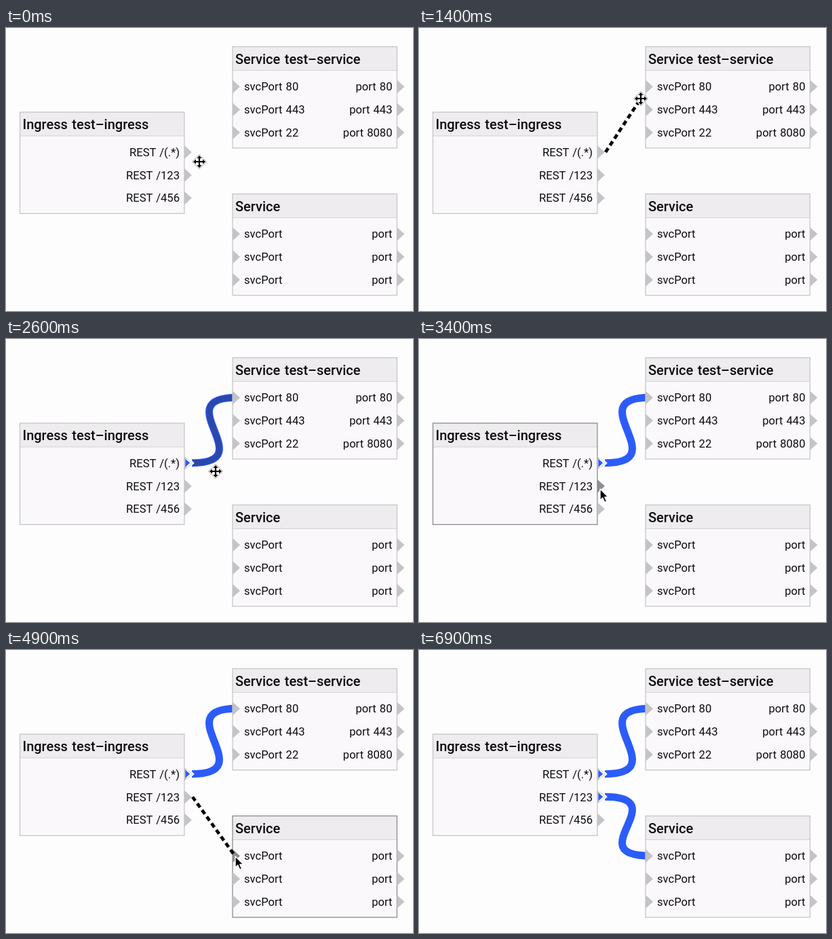
Write an HTML page that moves like this. It is 600 by 417 pixels and loops after 7 s.

```html
<!DOCTYPE html>
<html lang="en">
<head>
<meta charset="utf-8">
<title>Connecting ports</title>
<style>
  html, body { margin: 0; width: 100%; height: 100%; overflow: hidden; background: #fefdfe; }
  svg { display: block; width: 100vw; height: 100vh; }
  text { font: 16.6px Roboto, sans-serif; word-spacing: 1px; fill: #0c0c0c; }
  .title { font-size: 20px; font-weight: 500; word-spacing: 1.5px; }
  .end { text-anchor: end; }
  .body { fill: #faf8fb; }
  .head { fill: #eeecee; }
  .rule { stroke: #d3d2d5; }
  .frame { fill: none; stroke: #c6c5c8; stroke-width: 1.3; }
  .lit .frame { stroke: #8b8b8d; }
  .port { fill: #c4c3c6; }
  .port.lit { fill: #8e8e90; }
  .edge path { fill: none; stroke: #2b5cfb; stroke-width: 11; }
  .edge .core { stroke: #2a48ac; stroke-width: 8.5; display: none; }
  .edge.hover .core { display: inline; }
  .notch { fill: none; stroke: #fefdfe; stroke-width: 4.5; }
  .notch + .notch { stroke: #d3d2d5; stroke-width: 1; }
  #wire { stroke: #000; stroke-width: 4.7; stroke-dasharray: 7 5; }
</style>
</head>
<body>
<svg viewBox="0 0 600 417" preserveAspectRatio="none">
  <g id="edges"></g>
  <g id="nodes"></g>
  <g id="notches"></g>
  <line id="wire"/>
  <g id="move">
    <path d="M0-10.5 10.5 0 0 10.5-10.5 0Z" fill="#fff" stroke="#999"/>
    <g id="arms"></g>
  </g>
  <path id="arrow" d="M0 0V16.5L3.8 13 6.6 19.6 9.6 18.3 6.8 11.9H12Z"
        stroke="#fff" stroke-width="1.4" stroke-linejoin="round"/>
</svg>
<script>
const LOOP = 7000, STEP = 100;
const NODE_W = 242.4, NODE_H = 149.4, HEAD_H = 35;
const byId = id => document.getElementById(id);

function add(parent, tag, attrs = {}, text = '') {
  const el = document.createElementNS('http://www.w3.org/2000/svg', tag);
  for (const key in attrs) el.setAttribute(key, attrs[key]);
  el.textContent = text;
  return parent.appendChild(el);
}

const rowY = i => 59 + 33.8 * i;

function makeNode(x, y, title, inputs, outputs) {
  const g = add(byId('nodes'), 'g', { transform: `translate(${x} ${y})` });
  add(g, 'rect', { class: 'body', width: NODE_W, height: NODE_H });
  add(g, 'rect', { class: 'head', width: NODE_W, height: HEAD_H });
  add(g, 'line', { class: 'rule', x2: NODE_W, y1: HEAD_H, y2: HEAD_H });
  add(g, 'rect', { class: 'frame', width: NODE_W, height: NODE_H });
  add(g, 'text', { class: 'title', x: 4, y: 25 }, title);
  const makePort = (px, i) => add(g, 'path', { class: 'port', d: `M${px} ${rowY(i) - 10}l11 10-11 10Z` });
  const ports = { in: [], out: [] };
  inputs.forEach((label, i) => {
    ports.in.push(makePort(0, i));
    add(g, 'text', { x: 17, y: rowY(i) + 5.8 }, label);
  });
  outputs.forEach((label, i) => {
    ports.out.push(makePort(NODE_W, i));
    add(g, 'text', { class: 'end', x: 235.5, y: rowY(i) + 5.8 }, label);
  });
  return { g, ports };
}

const ingress = makeNode(20.5, 124, 'Ingress test–ingress', [], ['REST /(.*)', 'REST /123', 'REST /456']);
const service = makeNode(334, 27.5, 'Service test–service',
  ['svcPort 80', 'svcPort 443', 'svcPort 22'], ['port 80', 'port 443', 'port 8080']);
const blank = makeNode(334, 244.5, 'Service', Array(3).fill('svcPort'), Array(3).fill('port'));
const nodes = [ingress, service, blank];

function makeEdge(y1, y2, from) {
  const d = `M274 ${y1}C378 ${y1} 236 ${y2} 340 ${y2}`;
  const g = add(byId('edges'), 'g', { class: 'edge' });
  add(g, 'path', { d });
  add(g, 'path', { d, class: 'core' });
  const end = add(byId('notches'), 'g');
  add(end, 'path', { d: `M264.5 ${y1 - 6}l7 6-7 6Z`, fill: '#2b5cfb' });
  for (let i = 0; i < 2; i++)
    add(end, 'path', { class: 'notch', d: `M267 ${y1 - 7}l7.5 7-7.5 7` });
  return { g, end, from };
}

const edges = [makeEdge(182.7, 86.3, 21), makeEdge(216.3, 303.3, 53)];

for (let turn = 0; turn < 4; turn++)
  add(byId('arms'), 'path', { d: 'M0-9 3.5-5H1.1V1H-1.1V-5H-3.5Z', transform: `rotate(${turn * 90})` });

// Pointer path: step, x, y
const path = [
  [0, 285, 197], [1, 273, 187], [3, 273, 187], [5, 271, 185], [7, 271, 185],
  [9, 276, 180], [12, 308, 132], [14, 327, 104], [15, 331, 101],
  [16, 335, 92], [19, 337, 87], [23, 337, 87],
  [24, 335, 95], [25, 325, 140], [26, 309, 195], [27, 293, 208], [29, 272, 220],
  [31, 268, 222], [34, 267, 221], [38, 267, 221],
  [40, 280, 230], [42, 317, 283], [46, 335, 305],
  [47, 337, 304], [49, 338, 304], [57, 338, 304],
  [59, 325, 340], [61, 308, 393]
];
const POINTER_END = 61;

// Spans during which the pointer rests on a port: from, to, node, side, row
const hovers = [
  [1, 8, ingress, 'out', 0], [16, 24, service, 'in', 0],
  [29, 39, ingress, 'out', 1], [47, 58, blank, 'in', 0]
];

// Spans of dragging a loose wire: from, to, start height
const drags = [[8, 20, 183], [39, 52, 216.5]];

const within = (step, [from, to]) => step >= from && step <= to;
const show = (el, on) => el.setAttribute('visibility', on ? 'visible' : 'hidden');

function pointerAt(step) {
  const next = path.findIndex(key => key[0] >= step);
  if (next < 0) return path[path.length - 1].slice(1);
  if (next === 0) return path[0].slice(1);
  const [a, ax, ay] = path[next - 1], [b, bx, by] = path[next];
  const k = (step - a) / (b - a);
  return [ax + (bx - ax) * k, ay + (by - ay) * k];
}

function draw(step) {
  const [x, y] = pointerAt(step);
  const hover = hovers.find(span => within(step, span));
  const drag = drags.find(span => within(step, span));

  for (const node of nodes) node.g.classList.toggle('lit', hover?.[2] === node);
  for (const span of hovers) {
    const [, , node, side, row] = span;
    node.ports[side][row].classList.toggle('lit', span === hover);
  }

  for (const { g, end, from } of edges) {
    show(g, step >= from);
    show(end, step >= from);
  }
  edges[0].g.classList.toggle('hover', within(step, [25, 26]));

  const wire = byId('wire');
  show(wire, drag);
  if (drag) {
    const ends = { x1: 275, y1: drag[2], x2: x, y2: y };
    for (const key in ends) wire.setAttribute(key, ends[key]);
  }

  for (const [id, on] of [['arrow', hover], ['move', !hover]]) {
    show(byId(id), on && step <= POINTER_END);
    byId(id).setAttribute('transform', `translate(${x} ${y})`);
  }
}

const start = performance.now();
function tick() {
  draw(Math.floor(((performance.now() - start) % LOOP) / STEP));
  requestAnimationFrame(tick);
}
tick();
</script>
</body>
</html>
```
